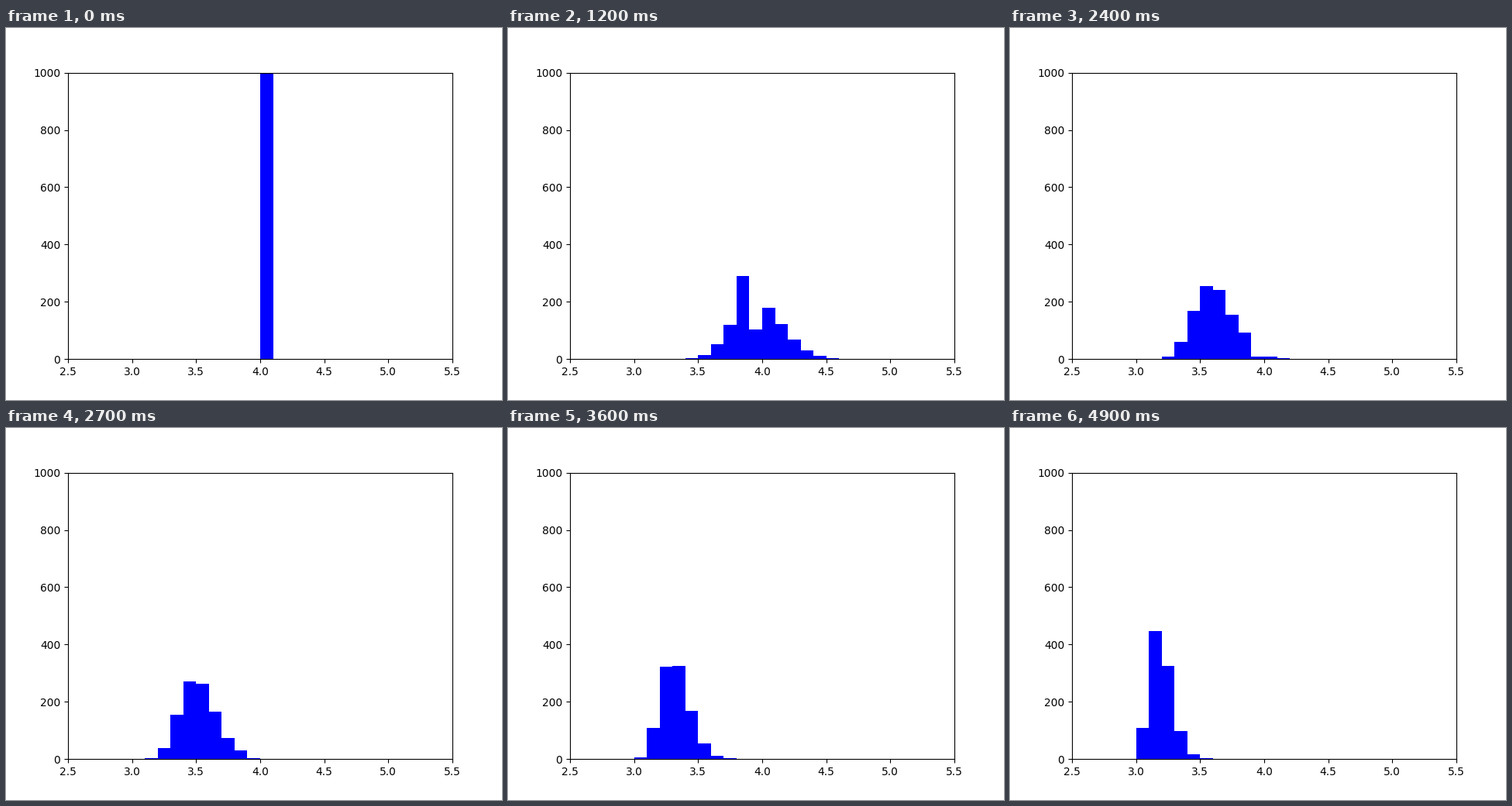
Write a matplotlib script that moves like this. It is 640 px wide and 480 px high and loops after 5 s.

```python
import numpy as np
import matplotlib.pyplot as plt
from matplotlib.animation import FuncAnimation

FRAMES, INTERVAL = 50, 100
SAMPLES, BINS, WIDTH = 1000, 30, 0.1
LEFT_EDGES = 2.5 + WIDTH * np.arange(BINS)

# Every sample is the mean of 20 whole numbers: 3 + excess / 20.
EXCESS = np.arange(50)
BIN_OF = (EXCESS + 10) // 2
BIN_OF[EXCESS == 18] -= 1  # 3.9 falls just short of its bin edge

KEY_TIMES = [6, 12, 18, 24, 31, 41, 49]
KEY_MEANS = [20, 18.9, 16.9, 11.75, 7.5, 4.56, 3.46]


def counts_at(frame):
    """Root-normal spread around a falling mean, opening up in the first frames."""
    mean = np.interp(frame, KEY_TIMES, KEY_MEANS)
    variance = 0.19 * min(1, frame / 6) + 1e-4
    root = np.sqrt(EXCESS + 0.5)
    center = np.sqrt(mean + 0.5 - variance)
    weights = np.exp(-(root - center) ** 2 / (2 * variance)) / root
    weights *= SAMPLES / weights.sum()
    return np.round(np.bincount(BIN_OF, weights, minlength=BINS)[:BINS])


fig, ax = plt.subplots(figsize=(6.4, 4.8), dpi=100)
bars = ax.bar(LEFT_EDGES, counts_at(0), WIDTH, align="edge", color="blue")
ax.set_xlim(2.5, 5.5)
ax.set_ylim(0, 1000)


def update(frame):
    for bar, height in zip(bars, counts_at(frame)):
        bar.set_height(height)
    return bars


anim = FuncAnimation(fig, update, frames=FRAMES, interval=INTERVAL, repeat=True)
plt.show()
```
